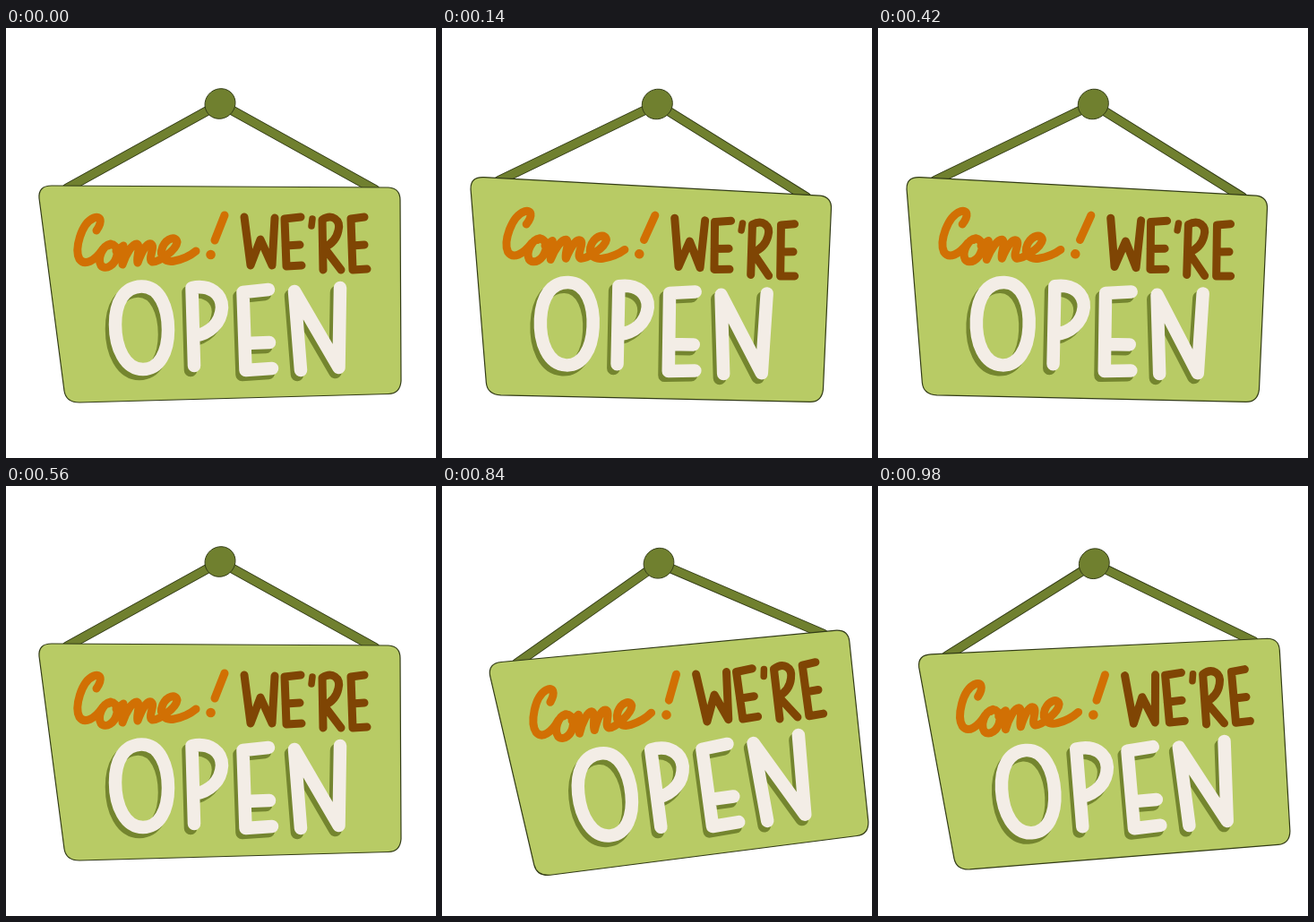
These frames come from a looping animation (480 px wide and 480 px high, 1120 ms). An HTML page:

```html
<!DOCTYPE html>
<html lang="en">
<head>
<meta charset="utf-8">
<title>Swinging open sign</title>
<style>
html, body { margin: 0; width: 100%; height: 100%; overflow: hidden; background: #fff; }
svg { display: block; width: 100vw; height: 100vh; }
path, polyline { fill: none; stroke-linecap: round; stroke-linejoin: round; }
.edge { stroke: #323b16; }
</style>
</head>
<body>
<svg viewBox="0 0 480 480" role="img" aria-label="Come! We're open">
  <polyline class="rope edge" stroke-width="10.8"/>
  <polyline class="rope" stroke="#70802f" stroke-width="9"/>
  <ellipse id="knob" class="edge" rx="17.4" ry="16.4" fill="#70802f" stroke-width=".9"/>
  <g id="board">
    <path class="edge" style="fill:#b8cb65" stroke-width="1.2" d="M37 190Q36 176 51 176L427 178Q440 179 440 192L441 394Q440 408 427 408.500L82 418Q67 418 65 405Z"/>
    <g stroke="#d17004" stroke-width="9">
      <path d="M101 226C108 216 106 209 98 212C84 218 76 247 82 258C88 266 99 260 108 247"/>
      <path d="M117 241C107 243 102 258 106 265C111 271 122 265 124 253C125 245 120 239 114 243M123 249L131 243L130 264C134 252 141 241 146 241C151 243 145 257 147 262C151 251 157 239 162 241C167 244 158 258 163 261C170 262 190 248 191 239C190 232 180 234 175 244C170 256 178 262 188 260C198 258 206 254 212 249"/>
      <path d="M244 209L233 237"/>
      <path stroke-width="10.500" d="M228.500 253h.1"/>
    </g>
    <g stroke="#7f4504" stroke-width="9">
      <path d="M266 211L273 265L284 236L297 265L300 212"/>
      <path d="M329 211L311 213L313 266L330 265M312 243L328 242"/>
      <path stroke-width="7.500" d="M342 213L341 221"/>
      <path d="M354 270L353 214C364 207 374 214 371 226C369 236 362 242 355 245L374 270"/>
      <path d="M400 211L385 213L387 270L403 269M386 243L400 242"/>
    </g>
    <g id="word" stroke-width="14.500">
      <path d="M151 288.500C172 288 181 313 181 337C181 362 171 381 153 381C133 381 122 357 122 331C122 306 132 289 151 288.500Z"/>
      <path d="M210 377L207.500 290C228 286 241 297 241 312C240 330 227 341 210 344"/>
      <path d="M293 292L264.500 295L267.500 382L297 380M266.500 352L294 351"/>
      <path d="M329 382L322 294L371.500 379L373 290"/>
    </g>
  </g>
</svg>
<script>
const STEP = 140, PIVOT = [239, 85], HOOKS = [[68, 179], [412, 180.5]];
// angle, pivot x and y, knob x and y
const rest = [0, 239, 85, 239, 84.5],
      left = [2.84, 239, 85, 240.3, 85],
      farLeft = [5.7, 238.5, 86.3, 241, 86],
      right = [-3, 242, 87.2, 241.3, 86.7],
      farRight = [-5.7, 244.2, 87.3, 242, 86.2];
const swing = [rest, left, farLeft, left, rest, right, farRight, right];

const knob = document.getElementById('knob');
const board = document.getElementById('board');
const word = document.getElementById('word');
const ropes = document.querySelectorAll('.rope');

const shadow = word.cloneNode(true);
shadow.removeAttribute('id');
shadow.setAttribute('stroke', '#74852f');
shadow.setAttribute('transform', 'translate(-4 5)');
word.setAttribute('stroke', '#f3ede6');
board.insertBefore(shadow, word);

function draw(now) {
  const [deg, px, py, kx, ky] = swing[Math.floor(now / STEP) % swing.length];
  const a = deg * Math.PI / 180, c = Math.cos(a), s = Math.sin(a);
  const place = ([x, y]) => {
    const dx = x - PIVOT[0], dy = y - PIVOT[1];
    return [px + dx * c - dy * s, py + dx * s + dy * c];
  };
  board.setAttribute('transform', `translate(${px} ${py}) rotate(${deg}) translate(${-PIVOT[0]} ${-PIVOT[1]})`);
  knob.setAttribute('transform', `translate(${kx} ${ky}) rotate(${deg - 40})`);
  const points = [place(HOOKS[0]), [kx, ky], place(HOOKS[1])].join(' ');
  ropes.forEach(rope => rope.setAttribute('points', points));
}

const start = performance.now();
function tick() {
  draw(performance.now() - start);
  requestAnimationFrame(tick);
}
tick();
</script>
</body>
</html>
```
